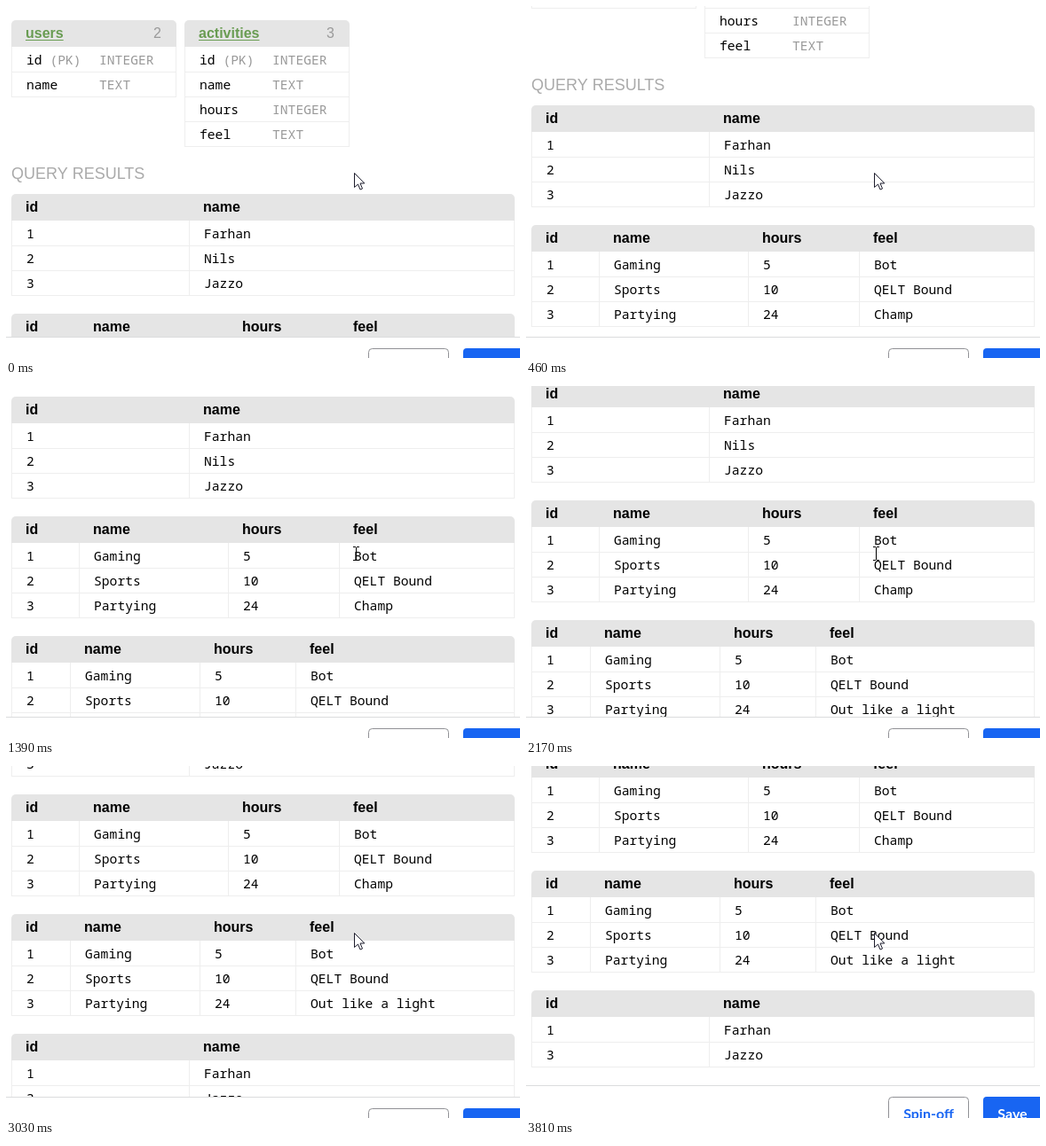
Recreate the animation shown at these times as an HTML page with a canvas. Size 579 by 397 pixels, loop 3880 ms.

```html
<!DOCTYPE html>
<html lang="en">
<head>
<meta charset="utf-8">
<title>Query results</title>
<style>
  html, body { margin: 0; width: 100%; height: 100%; overflow: hidden; background: #fff; }
  canvas { display: block; }
</style>
</head>
<body>
<canvas id="stage" width="579" height="397"></canvas>
<script>
const ctx = document.getElementById('stage').getContext('2d');
const W = 579, H = 397, LOOP = 3880;
const HEAD = 30, ROW = 28, BASE = 20;
const SANS = '16px Arial, "Liberation Sans", sans-serif';
const BOLD = 'bold ' + SANS;
const TITLE = '18px Arial, "Liberation Sans", sans-serif';
const MONO = '14.66px "Noto Sans Mono", "DejaVu Sans Mono", monospace';
const LATO = 'bold 16px Lato, sans-serif';
const GREY = '#999', LINE = '#eee', BAR = '#e5e5e5', BLUE = '#1865f2', GREEN = '#699c52';

const schemas = [
  { x: 6, name: 'users', count: 2, fields: [['id (PK)', 'INTEGER'], ['name', 'TEXT']] },
  { x: 201, name: 'activities', count: 3,
    fields: [['id (PK)', 'INTEGER'], ['name', 'TEXT'], ['hours', 'INTEGER'], ['feel', 'TEXT']] }
];

const people = [['1', 'Farhan'], ['2', 'Nils'], ['3', 'Jazzo']];
const activities = last => [
  ['1', 'Gaming', '5', 'Bot'],
  ['2', 'Sports', '10', 'QELT Bound'],
  ['3', 'Partying', '24', last]
];
const pair = ['id', 'name'], full = ['id', 'name', 'hours', 'feel'];
const results = [
  { y: 212, cols: [6, 206], heads: pair, rows: people },
  { y: 347, cols: [6, 82, 250, 375], heads: full, rows: activities('Champ') },
  { y: 482, cols: [6, 72, 218, 326], heads: full, rows: activities('Out like a light') },
  { y: 617, cols: [6, 206], heads: pair, rows: [people[0], people[2]] }
];

// Each wheel turn eases over a few discrete steps.
const turns = [
  { at: 230, by: 100, steps: 4 },
  { at: 1160, by: 100, steps: 4 },
  { at: 2170, by: 100, steps: 4 },
  { at: 3030, by: 51, steps: 3 }
];
const stepTimes = [0, 80, 150, 230];

function turnAmount(turn, t) {
  const done = stepTimes.slice(0, turn.steps).filter(s => t >= turn.at + s).length;
  if (!done) return 0;
  if (done === turn.steps) return turn.by;
  const u = (0.27 + 0.26 * (done - 1)) * 4 / turn.steps;
  return Math.round(turn.by * u * u * (3 - 2 * u));
}

function text(str, x, y, font, color, align = 'left') {
  ctx.font = font;
  ctx.fillStyle = color;
  ctx.textAlign = align;
  ctx.fillText(str, x, y);
}

function rect(x, y, w, h, color) {
  ctx.fillStyle = color;
  ctx.fillRect(x, y, w, h);
}

function frame(x, y, w, rows) {
  ctx.fillStyle = BAR;
  ctx.beginPath();
  ctx.roundRect(x, y, w, HEAD, [5, 5, 0, 0]);
  ctx.fill();
  const top = y + HEAD;
  for (let i = 1; i <= rows; i++) rect(x, top + i * ROW, w, 1, LINE);
  rect(x, top, 1, rows * ROW, LINE);
  rect(x + w - 1, top, 1, rows * ROW, LINE);
}

function drawSchema({ x, name, count, fields }) {
  const y = 16;
  frame(x, y, 186, fields.length);
  text(name, x + 16, y + BASE, BOLD, GREEN);
  rect(x + 16, y + BASE + 2, ctx.measureText(name).width, 1, GREEN);
  text(count, x + 169, y + BASE, SANS, GREY, 'right');
  fields.forEach(([field, type], i) => {
    const base = y + HEAD + i * ROW + BASE;
    const [label, key] = field.split(' ');
    text(label, x + 17, base, MONO, '#000');
    if (key) text(key, x + 17 + ctx.measureText(label + ' ').width, base, MONO, GREY);
    text(type, x + 99, base, MONO, GREY);
  });
}

function drawResult({ y, cols, heads, rows }) {
  frame(6, y, 567, rows.length);
  cols.forEach((x, c) => {
    text(heads[c], x + 16, y + BASE, BOLD, '#000');
    if (c) rect(x, y + HEAD, 1, rows.length * ROW, LINE);
    rows.forEach((row, r) => text(row[c], x + 17, y + HEAD + r * ROW + BASE, MONO, '#000'));
  });
}

function drawFooter(y) {
  rect(0, y, W, H - y, '#fff');
  rect(0, y, W, 1, '#dbdcdd');
  ctx.strokeStyle = '#909195';
  ctx.lineWidth = 1;
  ctx.beginPath();
  ctx.roundRect(408.5, y + 13.5, 90, 39, 4);
  ctx.stroke();
  ctx.fillStyle = BLUE;
  ctx.beginPath();
  ctx.roundRect(515, y + 13, 67, 40, 4);
  ctx.fill();
  text('Spin-off', 453.5, y + 38, LATO, BLUE, 'center');
  text('Save', 548, y + 38, LATO, '#fff', 'center');
}

function drawArrow(x, y) {
  const points = [[0, 0], [0, 16], [4, 12.5], [6.5, 18.5], [9, 17.5], [6.5, 11.5], [11.3, 11.5]];
  ctx.beginPath();
  points.forEach(([dx, dy]) => ctx.lineTo(x + dx, y + dy));
  ctx.closePath();
  ctx.fillStyle = '#fff';
  ctx.fill();
  ctx.strokeStyle = '#1c1c2c';
  ctx.lineWidth = 1;
  ctx.stroke();
}

function drawBeam(x, y) {
  rect(x, y + 1, 1, 14, '#000');
  for (const dy of [0, 15]) {
    rect(x - 3, y + dy, 3, 1, '#000');
    rect(x + 1, y + dy, 3, 1, '#000');
  }
}

function draw(t) {
  const lift = t >= 3810 ? 13 : 0;
  const scroll = turns.reduce((sum, turn) => sum + turnAmount(turn, t), lift);
  rect(0, 0, W, H, '#fff');
  ctx.save();
  ctx.translate(0, -scroll);
  schemas.forEach(drawSchema);
  text('QUERY RESULTS', 6, 195, TITLE, '#aaa');
  results.forEach(drawResult);
  ctx.restore();
  drawFooter(373 - lift);
  if (t >= 1390 && t < 2400) drawBeam(394, 181);
  else drawArrow(392.5, 188.5);
}

const start = performance.now();
function tick() {
  draw((performance.now() - start) % LOOP);
  requestAnimationFrame(tick);
}
tick();
</script>
</body>
</html>
```
